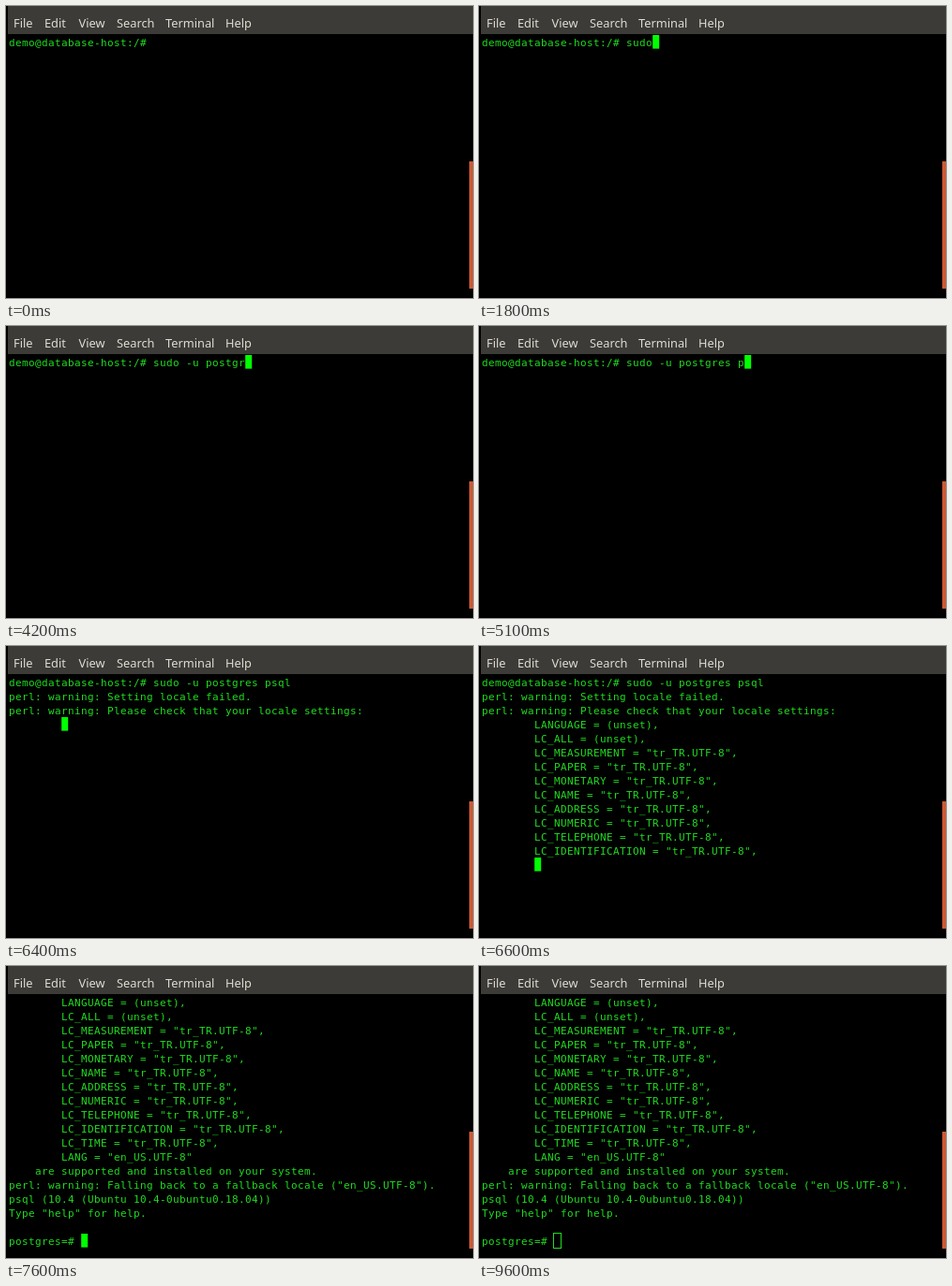
Recreate the animation shown at these times as an HTML page. Size 498 by 312 pixels, loop 9700 ms.

```html
<!DOCTYPE html>
<html lang="en">
<head>
<meta charset="utf-8">
<title>Terminal</title>
<style>
html, body { margin: 0; width: 100%; height: 100%; overflow: hidden; background: #000; }
svg { display: block; }
text { white-space: pre; }
#menu text { font: 12.8px "Noto Sans", "Open Sans", sans-serif; fill: #dfdbd2; }
#rows text { font: 11px "DejaVu Sans Mono", monospace; letter-spacing: .377px; fill: #1fdc1f; }
</style>
</head>
<body>
<svg width="498" height="312" viewBox="0 0 498 312">
  <rect width="498" height="312"/>
  <rect x="2" width="496" height="30" fill="#3c3b37"/>
  <g id="menu">
    <text x="8" y="23">File</text>
    <text x="41" y="23">Edit</text>
    <text x="77.5" y="23">View</text>
    <text x="118" y="23">Search</text>
    <text x="170" y="23">Terminal</text>
    <text x="234" y="23">Help</text>
  </g>
  <g id="rows"></g>
  <rect id="cursor" stroke="#1fdc1f"/>
  <rect id="bar" x="494" width="4" fill="#cb5a33"/>
</svg>
<script>
const LOOP = 9700, ROWS = 18, CELL = 7, LINE = 15, LEFT = 3, TOP = 31;
const $ = id => document.getElementById(id);
const prompt = 'demo@database-host:/# ', command = 'sudo -u postgres psql';
const locale = name => `        LC_${name} = "tr_TR.UTF-8",`;
const lines = [
  prompt + command,
  'perl: warning: Setting locale failed.',
  'perl: warning: Please check that your locale settings:',
  '        LANGUAGE = (unset),',
  '        LC_ALL = (unset),',
  ...['MEASUREMENT', 'PAPER', 'MONETARY', 'NAME', 'ADDRESS', 'NUMERIC',
      'TELEPHONE', 'IDENTIFICATION', 'TIME'].map(locale),
  '        LANG = "en_US.UTF-8"',
  '    are supported and installed on your system.',
  'perl: warning: Falling back to a fallback locale ("en_US.UTF-8").',
  'psql (10.4 (Ubuntu 10.4-0ubuntu0.18.04))',
  'Type "help" for help.',
  '',
  'postgres=# '
];
const last = lines.length - 1;

// [time, characters typed] and [time, complete lines printed]
const typing = [[0, 0], [1000, 1], [1300, 2], [1500, 3], [1800, 4], [2100, 5], [2300, 6],
  [2900, 7], [3100, 8], [3300, 10], [3400, 11], [3700, 12], [3900, 13],
  [4200, 14], [4400, 15], [4600, 16], [4800, 17],
  [5100, 18], [5300, 19], [5500, 20], [5700, 21]];
const printing = [[0, 0], [6200, 1], [6400, 3], [6500, 8], [6600, 13], [6700, last]];
const at = (steps, t) => steps.findLast(s => s[0] <= t)[1];

const rows = Array.from({ length: ROWS }, (_, i) => {
  const row = document.createElementNS('http://www.w3.org/2000/svg', 'text');
  set(row, { x: LEFT, y: TOP + 12 + i * LINE });
  return $('rows').appendChild(row);
});

function set(el, attrs) {
  for (const k in attrs) el.setAttribute(k, attrs[k]);
}

function cursorShown(t) {
  if (t < 500) return false;
  if (t < 7000 || t >= 9600) return true;
  return Math.floor((t - 7000) / 600) % 2 === 1;
}

function draw(t) {
  const done = at(printing, t);
  const current = done === 0 ? prompt + command.slice(0, at(typing, t))
    : done === last ? lines[last]
    : lines[done].match(/^ */)[0];
  const screen = [...lines.slice(0, done), current].slice(-ROWS);
  rows.forEach((row, i) => {
    const s = screen[i] || '';
    if (row.textContent !== s) row.textContent = s;
  });

  const x = LEFT + current.length * CELL, y = TOP + (screen.length - 1) * LINE;
  const hollow = t >= 9600;
  set($('cursor'), hollow
    ? { x: x - .5, y: y - .5, width: CELL + 1, height: LINE + 1, fill: 'none', 'stroke-width': 1 }
    : { x: x + .2, y, width: CELL, height: LINE - .4, fill: '#0f0', 'stroke-width': 0 });
  $('cursor').style.visibility = cursorShown(t) ? 'visible' : 'hidden';

  const barTop = done === last ? 177 : 166;
  set($('bar'), { y: barTop, height: 302 - barTop });
}

const start = performance.now();
function tick() {
  draw((performance.now() - start) % LOOP);
  requestAnimationFrame(tick);
}
tick();
</script>
</body>
</html>
```
